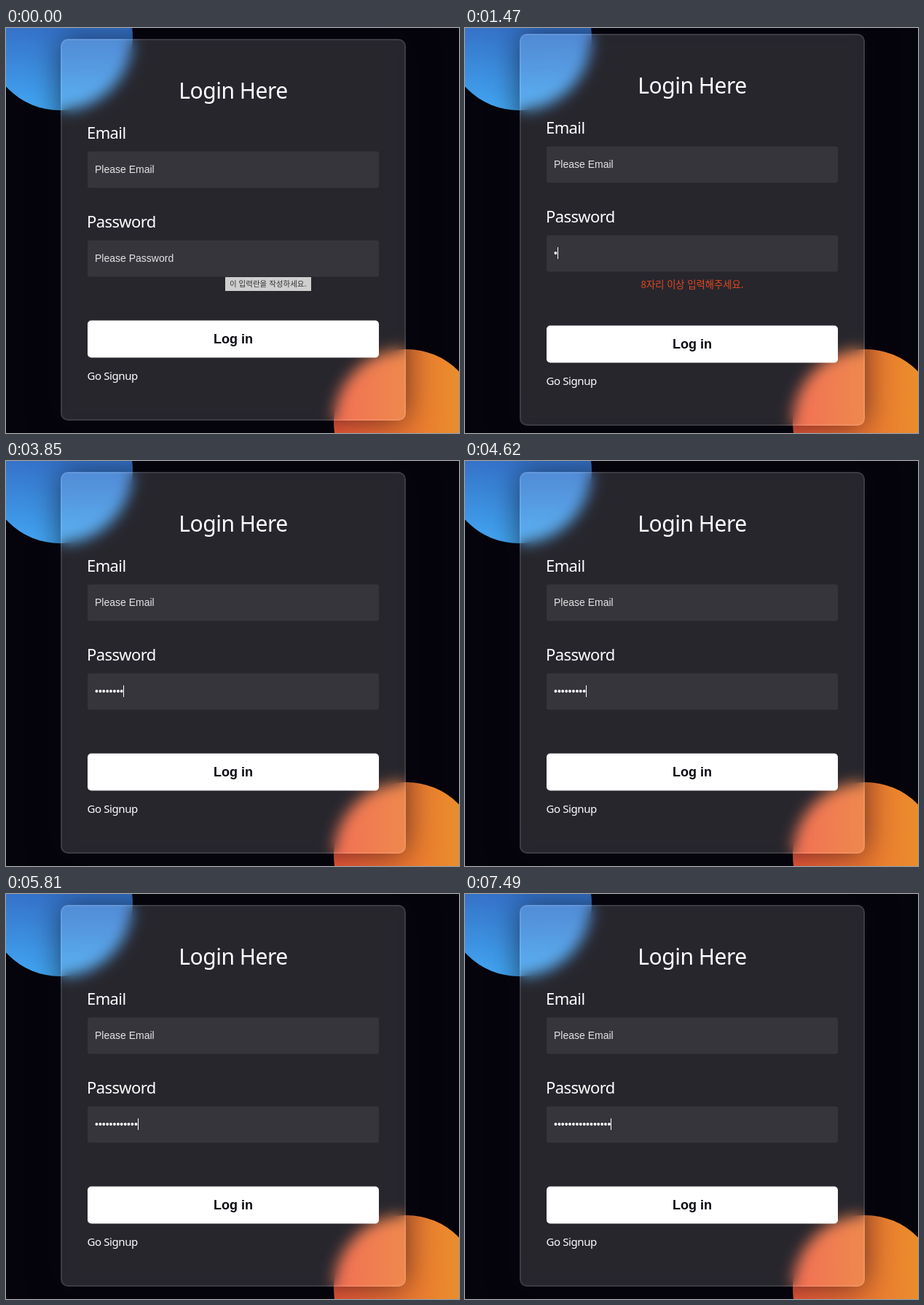
An HTML page that plays this animation: 622 by 556 pixels, repeating every 7.84 s.

```html
<!DOCTYPE html>
<html lang="ko">
<head>
<meta charset="utf-8">
<title>Login</title>
<style>
/* --n typed characters, --tall hint row open, --caret and --tip visibility */
@property --n { syntax: "<integer>"; inherits: true; initial-value: 0; }
@property --tall { syntax: "<integer>"; inherits: true; initial-value: 0; }
@property --caret { syntax: "<integer>"; inherits: true; initial-value: 0; }
@property --tip { syntax: "<integer>"; inherits: true; initial-value: 1; }

html, body { margin: 0; width: 100%; height: 100%; overflow: hidden; background: #05040c; }

#stage {
  position: relative;
  width: 622px;
  height: 556px;
  overflow: hidden;
  background: #05040c;
  animation: play 7840ms step-end infinite;
}
#stage > * { position: absolute; }

.ball { width: 200px; height: 200px; border-radius: 50%; }
.blue { left: -26px; top: -87px; background: linear-gradient(#2b4aaa, #42a6f2); }
.orange { left: 450px; top: 441px; background: linear-gradient(to right, #f0593a, #e8962a); }

.card {
  left: 75px;
  top: calc(15px - 7px * var(--tall));
  width: 474px;
  height: calc(524px + 14px * var(--tall));
  box-sizing: border-box;
  border: 2px solid rgba(255, 255, 255, .1);
  border-radius: 10px;
  background: rgba(255, 255, 255, .137);
  backdrop-filter: blur(10px);
  box-shadow: 0 0 40px rgba(8, 7, 16, .6);
}

svg { left: 0; top: 0; }
.upper { transform: translateY(calc(-7px * var(--tall))); }
.lower { transform: translateY(calc(7px * var(--tall))); }
.field { fill: rgba(255, 255, 255, .07); }
.head { font: 500 30px "Noto Sans", sans-serif; letter-spacing: -.5px; fill: #fff; }
.label { font: 500 22px "Noto Sans", sans-serif; letter-spacing: -.6px; fill: #fff; }
.link { font: 15px "Noto Sans", sans-serif; letter-spacing: -.4px; fill: #fff; }
.hint { font: 14px "Liberation Sans", Arial, sans-serif; fill: #e5e5e5; }
.empty { opacity: calc(1 - var(--n)); }
.submit { font: bold 18px "Liberation Sans", Arial, sans-serif; fill: #080710; }
.error { font: 13.3px "Noto Sans CJK KR", "Noto Sans CJK", sans-serif; fill: #e5481f; opacity: var(--tall); }
.tip { opacity: var(--tip); }
.tip text { font: 10.5px "Noto Sans CJK KR", "Noto Sans CJK", sans-serif; fill: #333; }

.dots, .caret { top: calc(308px - 7px * var(--tall)); height: 16px; }
.dots {
  left: 122px;
  width: calc(4.9px * var(--n));
  overflow: hidden;
  white-space: nowrap;
  font: 14px/16px "Liberation Sans", Arial, sans-serif;
  color: #fff;
}
.caret {
  left: calc(122px + 4.9px * var(--n));
  width: 1px;
  background: #fff;
  opacity: var(--caret);
  transform: translateY(max(0px, 1px - 1px * var(--n)));
}

@keyframes play {
  0% { --n: 0; --tall: 0; --caret: 0; --tip: 1; }
  8.035% { --caret: 1; --tip: 0; }
  15.178% { --caret: 0; }
  18.749% { --n: 1; --tall: 1; --caret: 1; }
  21.428% { --n: 2; }
  25.892% { --n: 3; }
  30.357% { --n: 4; }
  35.714% { --n: 5; }
  39.285% { --n: 6; }
  43.749% { --n: 7; }
  49.107% { --n: 8; --tall: 0; }
  55.357% { --caret: 0; }
  58.928% { --n: 9; --caret: 1; }
  64.285% { --n: 10; }
  69.642% { --n: 11; }
  74.107% { --n: 12; }
  79.464% { --n: 13; }
  83.928% { --n: 14; }
  90.178% { --n: 15; }
  95.535% { --n: 16; }
  100% { --n: 16; --tall: 0; --caret: 1; --tip: 0; }
}
</style>
</head>
<body>
<div id="stage">
  <div class="ball blue"></div>
  <div class="ball orange"></div>
  <div class="card"></div>
  <svg width="622" height="556" viewBox="0 0 622 556">
    <g class="upper">
      <text class="head" x="312" y="97" text-anchor="middle">Login Here</text>
      <text class="label" x="111" y="151.5">Email</text>
      <rect class="field" x="112" y="169.5" width="400" height="50" rx="3"/>
      <text class="hint" x="122" y="199">Please Email</text>
      <text class="label" x="111" y="273.5">Password</text>
      <rect class="field" x="112" y="291.5" width="400" height="50" rx="3"/>
      <text class="hint empty" x="122" y="321">Please Password</text>
    </g>
    <text class="error" x="312" y="357" text-anchor="middle">8자리 이상 입력해주세요.</text>
    <g class="lower">
      <rect x="112" y="401.5" width="400" height="51" rx="5" fill="#fff"/>
      <text class="submit" x="312" y="433" text-anchor="middle">Log in</text>
      <text class="link" x="111.5" y="482.5">Go Signup</text>
    </g>
    <g class="tip">
      <rect x="301" y="342" width="118" height="19" fill="#cfcfcf"/>
      <text x="307" y="355">이 입력란을 작성하세요.</text>
    </g>
  </svg>
  <div class="dots">••••••••••••••••</div>
  <div class="caret"></div>
</div>
</body>
</html>
```
